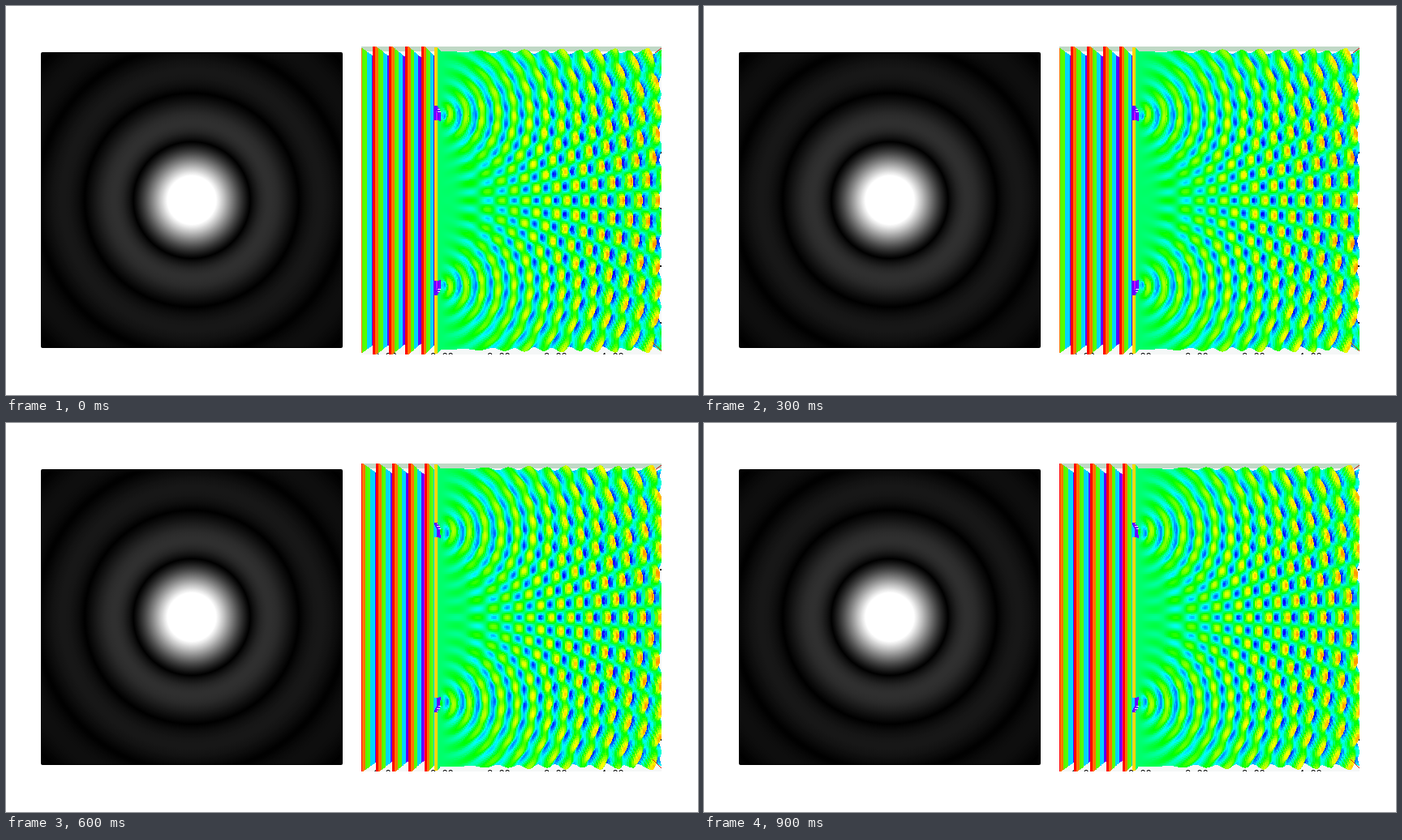
Recreate the animation shown at these times as an HTML page with a canvas. Size 853 by 480 pixels, loop 0.96 s.

```html
<!DOCTYPE html>
<html>
<head>
<meta charset="utf-8">
<style>
html, body { margin: 0; width: 100%; height: 100%; overflow: hidden; background: #fff; }
canvas { display: block; }
</style>
</head>
<body>
<canvas id="stage" width="853" height="480"></canvas>
<script>
const TAU = 2 * Math.PI;
const ctx = document.getElementById('stage').getContext('2d');

// Right panel: a height field seen from above in perspective.
const LEFT = 438, TOP = 50, W = 370, H = 380;
const CELL = 183.5 / 95, COLS = 193, ROWS = 95;
const PER_WAVE = 10, DEPTH = 0.04, SUB = 6;
const WALL = 49, WALL_END = 51, WALL_HEIGHT = 0.65;
const SLIT_Y = 105.5, SLIT_HALF = 7.5;
const gridX = i => (i - COLS / 2) * CELL;
const gridY = j => (j - ROWS) * CELL;

// Wave advance in grid cells for each 60 ms step.
const STEP_MS = 60;
const advance = [0, 2, 4, 6, 8, 10, 12, 15, 17, 19, 22, 24, 26, 28, 30, 32];

function ripple(dx, dy, n) {
  const r = Math.hypot(dx, dy) || 1;
  return 0.45 * (dx / r) ** 1.5 * Math.cos(TAU * (r / (CELL * PER_WAVE) - n / PER_WAVE - 0.77));
}

function height(i, j, n) {
  if (i < WALL) return Math.cos(TAU * (i - 2.5 - n) / PER_WAVE);
  const y = gridY(j);
  if (i <= WALL_END) {
    return Math.abs(y + SLIT_Y) < SLIT_HALF
      ? 0.8 * Math.cos(TAU * (n - 6) / PER_WAVE) - 0.2 : WALL_HEIGHT;
  }
  const dx = gridX(i) - gridX(WALL_END);
  return ripple(dx, y + SLIT_Y, n) + ripple(dx, y - SLIT_Y, n);
}

const unit = v => Math.round(255 * Math.max(0, Math.min(1, v)));

function rainbow(h) {
  const hue = Math.max(0, 145 - 145 * h) / 60;
  const r = unit(Math.abs(hue - 3) - 1);
  const g = unit(2 - Math.abs(hue - 2));
  const b = unit(2 - Math.abs(hue - 4));
  return (255 << 24 | b << 16 | g << 8 | r) >>> 0;
}

function renderSurface(n) {
  const layer = new OffscreenCanvas(W, H);
  const g = layer.getContext('2d');
  const image = g.createImageData(W, H);
  const pixels = new Uint32Array(image.data.buffer);
  const depth = new Float32Array(W * H / 2).fill(-9);
  const stride = COLS + 1;
  const field = new Float32Array(stride * (ROWS + 1));
  for (let j = 0; j <= ROWS; j++)
    for (let i = 0; i <= COLS; i++) field[j * stride + i] = height(i, j, n);

  for (let j = 0; j < ROWS; j++) {
    for (let i = 0; i < COLS; i++) {
      const k = j * stride + i;
      const color = rainbow(height(i + 0.5, j + 0.5, n));
      for (let b = 0; b < SUB; b++) {
        const v = (b + 0.5) / SUB, y = gridY(j + v);
        const h0 = field[k] + (field[k + stride] - field[k]) * v;
        const h1 = field[k + 1] + (field[k + stride + 1] - field[k + 1]) * v;
        for (let a = 0; a < SUB; a++) {
          const u = (a + 0.5) / SUB, h = h0 + (h1 - h0) * u;
          const scale = 1 + DEPTH * h;
          const px = Math.floor(W / 2 - 1 + gridX(i + u) * scale);
          const py = Math.floor(H / 2 + y * scale);
          if (px < 0 || px >= W || py < 0) continue;
          const at = py * W + px;
          if (h <= depth[at]) continue;
          depth[at] = h;
          pixels[at] = pixels[(H - 1 - py) * W + px] = color;
        }
      }
    }
  }
  g.putImageData(image, 0, 0);
  return layer;
}

const surfaces = Array.from({ length: PER_WAVE }, (_, n) =>
  advance.some(a => a % PER_WAVE === n) ? renderSurface(n) : null);

function line(color, x0, y0, x1, y1) {
  ctx.strokeStyle = color;
  ctx.beginPath();
  ctx.moveTo(x0, y0);
  ctx.lineTo(x1, y1);
  ctx.stroke();
}

function drawWaves(n) {
  ctx.save();
  ctx.beginPath();
  ctx.rect(LEFT, TOP, W, H);
  ctx.clip();
  ctx.fillStyle = '#f5f7f7';
  ctx.fillRect(LEFT, TOP, W, H);
  ctx.fillStyle = '#c0d8c6';
  ctx.fillRect(LEFT, TOP, W, 6);
  ctx.fillStyle = '#000';
  ctx.font = '12px "Liberation Mono", monospace';
  ['-2.00', '0.00', '2.00', '3.00', '4.00'].forEach((label, i) =>
    ctx.fillText(label, (i ? 523 : 446) + 70 * Math.max(0, i - 1), 437));
  for (const y of [109, 181, 250, 321, 391]) ctx.fillRect(806, y - 1, 2, 2);
  line('#c00000', 800, 58, 808, 52);
  ctx.drawImage(surfaces[n % PER_WAVE], LEFT, TOP);
  line('#e02000', 797, 415, 808, 426);
  ctx.restore();
}

// Left panel: diffraction disc, |2 J1(x) / x| along the radius.
function besselJ1(x) {
  const steps = 48;
  let sum = 0;
  for (let k = 0; k < steps; k++) {
    const a = Math.PI * (k + 0.5) / steps;
    sum += Math.cos(a - x * Math.sin(a));
  }
  return sum / steps;
}

const disc = ctx.createRadialGradient(229, 239.5, 0, 229, 239.5, 270);
for (let k = 0; k <= 135; k++) {
  const x = (k * 2 + 0.01) / 18.8;
  const v = unit(1.4 * Math.abs(2 * besselJ1(x) / x));
  disc.addColorStop(k / 135, `rgb(${v},${v},${v})`);
}

function drawDisc() {
  ctx.fillStyle = '#000';
  ctx.beginPath();
  ctx.roundRect(43, 57, 372, 365, 2);
  ctx.fill();
  ctx.fillStyle = disc;
  ctx.fillRect(44, 58, 370, 363);
}

function draw() {
  const step = Math.floor(performance.now() / STEP_MS) % advance.length;
  ctx.fillStyle = '#fff';
  ctx.fillRect(0, 0, 853, 480);
  drawDisc();
  drawWaves(advance[step]);
  requestAnimationFrame(draw);
}
draw();
</script>
</body>
</html>
```
